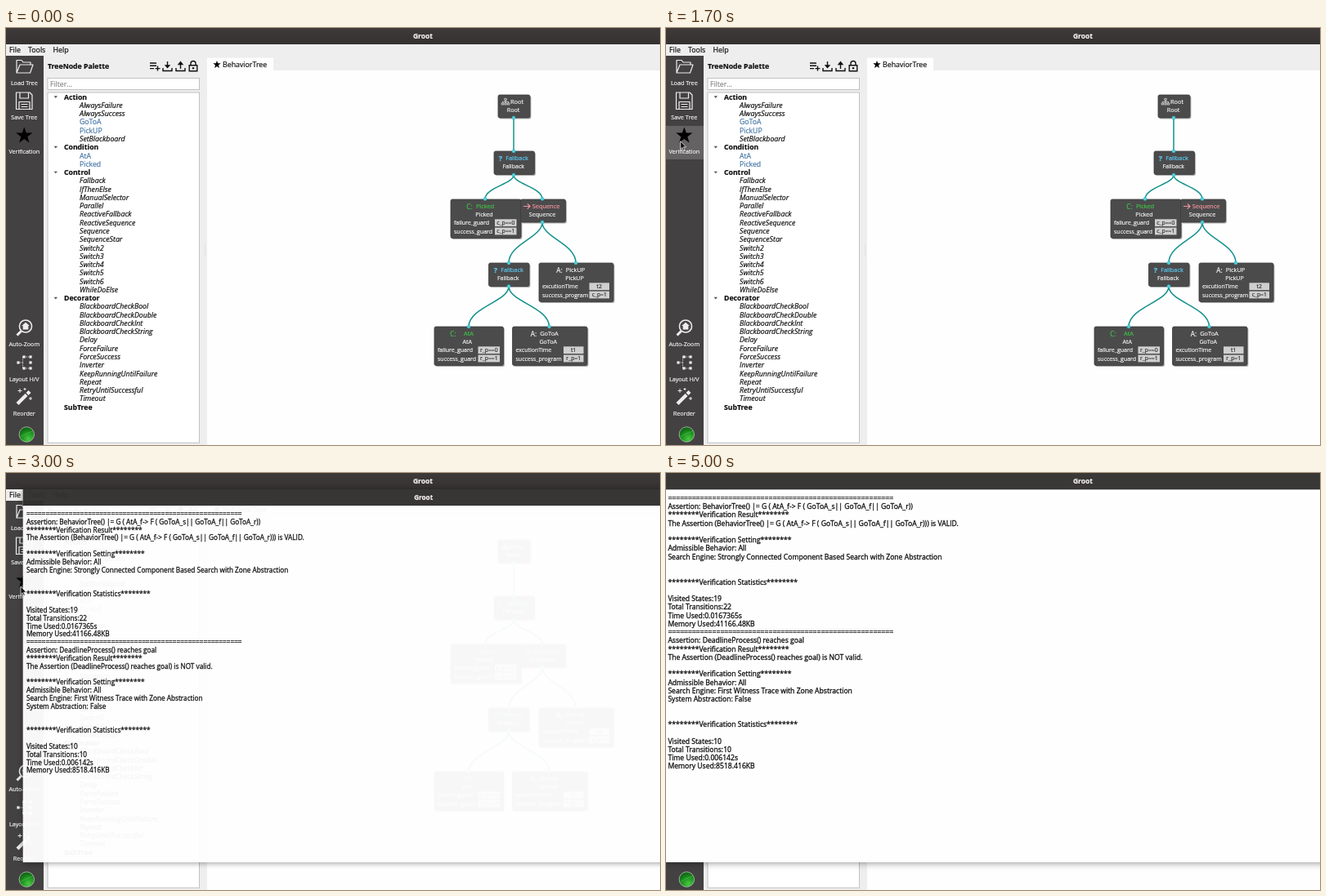
An HTML page for the animation above (5300 ms loop, 800 px wide and 511 px high).

```html
<!DOCTYPE html>
<html lang="en">
<head>
<meta charset="utf-8">
<title>Behavior tree editor</title>
<style>
html, body { margin: 0; width: 100%; height: 100%; overflow: hidden; background: #fff; }
svg { display: block; width: 100vw; height: 100vh; font-family: "Open Sans", "Noto Sans", sans-serif; }
</style>
</head>
<body>
<svg id="stage" viewBox="0 0 800 511">
  <defs>
    <radialGradient id="ball" cx=".62" cy=".8" r=".85">
      <stop offset="0" stop-color="#4cc747"/><stop offset=".45" stop-color="#1f9a22"/><stop offset="1" stop-color="#0d5512"/>
    </radialGradient>
    <linearGradient id="bar" x2="0" y2="1">
      <stop offset="0" stop-color="#3e3a3a"/><stop offset="1" stop-color="#353131"/>
    </linearGradient>
    <path id="star" d="M0-10.5 2.5-3.4H10L4 1.2 6.2 8.4 0 4.1-6.2 8.4-4 1.2-10-3.4H-2.5Z"/>
  </defs>
  <g id="app"></g>
  <g id="dialog"></g>
  <path id="cursor" d="M0 0V9.8L2.2 7.8 3.9 11.4 5.4 10.7 3.8 7.2H6.9Z" fill="#111" stroke="#fff" stroke-width=".7"/>
</svg>
<script>
const LOOP = 5300, STEP = 100;
const byId = id => document.getElementById(id);
const app = byId('app'), dialog = byId('dialog'), cursor = byId('cursor');

function add(parent, tag, attrs) {
  const el = document.createElementNS('http://www.w3.org/2000/svg', tag);
  for (const k in attrs) el.setAttribute(k, attrs[k]);
  return parent.appendChild(el);
}
const rect = (g, x, y, width, height, fill, more) => add(g, 'rect', { x, y, width, height, fill, ...more });
const path = (g, d, more) => add(g, 'path', { d, fill: 'none', ...more });

// y is the middle of the capitals; the thin stroke gives a slightly heavier weight
function text(g, x, y, str, size, fill = '#111', more) {
  const el = add(g, 'text', { x, y: y + size * .36, 'font-size': size, fill, stroke: fill, 'stroke-width': .2, ...more });
  el.textContent = str;
}
const MID = { 'text-anchor': 'middle' }, BOLD = { 'font-weight': 700 }, ITALIC = { 'font-style': 'italic' };

// Frame of the main window
rect(app, 0, 0, 800, 511, '#efeeee');
rect(app, 0, 0, 800, 20, 'url(#bar)');
text(app, 510, 9.5, 'Groot', 8.5, '#f4f2f0', { ...MID, ...BOLD });
[['File', 4], ['Tools', 27], ['Help', 57.5]].forEach(([s, x]) => text(app, x, 27, s, 8.8));
rect(app, 246, 52, 554, 459, '#fefefe');
rect(app, 246, 36.5, 81, 16, '#fefefe');
add(app, 'use', { href: '#star', transform: 'translate(258 45)scale(.48)' });
text(app, 265, 45, 'BehaviorTree', 8.8);
path(app, 'M243.5 266V280', { stroke: '#cfcdcd', 'stroke-dasharray': '1 2' });

// Toolbar
rect(app, 0, 34, 46, 477, '#434141');
const hover = rect(app, 0, 120, 46, 41, '#646262');
[['Load Tree', 67], ['Save Tree', 109], ['Verification', 151.5], ['Auto-Zoom', 387.5], ['Layout H/V', 430.5], ['Reorder', 472]]
  .forEach(([s, y]) => text(app, 22.3, y, s, 7.2, '#f3f3f3', MID));
const LINE = { stroke: '#eee', 'stroke-width': 1.2, 'stroke-linejoin': 'round' };
path(app, 'M13 55V39.5H19L21 42H30V45M13 55 17 45H33L29.5 55Z', LINE);
path(app, 'M12.5 79H29L32 82V99.5H12.5ZM17 79V86H27.5V79M16 99V90.5H29V99M18.5 93.5H26.5M18.5 96.5H26.5', LINE);
add(app, 'use', { href: '#star', transform: 'translate(22.3 132)' });
add(app, 'circle', { cx: 24, cy: 365.5, r: 7.6, fill: '#4a4848', stroke: '#eee', 'stroke-width': 1.5 });
path(app, 'M18.5 371.5 13.5 376.5', { stroke: '#eee', 'stroke-width': 3 });
path(app, 'M24 360.8 28.8 365H27.3V369.5H20.7V365H19.2Z', { fill: '#eee' });
path(app, 'M15 410H20.5V403H28M20.5 410V417H28', { stroke: '#ccc', 'stroke-dasharray': '1.5 1.2' });
[[15, 410], [22, 403], [30, 403], [22, 417], [30, 417], [30, 410]].forEach(([x, y]) =>
  rect(app, x - 1.6, y - 1.6, 3.2, 3.2, '#eee'));
path(app, 'M14 460.5 25 449.5', { stroke: '#eee', 'stroke-width': 4.2 });
path(app, 'M26 448.5 29 445.5', { stroke: '#eee', 'stroke-width': 4.2 });
path(app, 'M17 442V447M14.5 444.5H19.5M23 441V444M21.5 442.5H24.5M30 452V456M28 454H32', { stroke: '#eee' });
add(app, 'circle', { cx: 25.3, cy: 498, r: 9.2, fill: 'url(#ball)', stroke: '#b9c9b6', 'stroke-width': .8 });
path(app, 'M17.5 501Q23 497 33 494', { stroke: '#8be08a', 'stroke-width': .8, opacity: .4 });

// Palette
text(app, 51, 47, 'TreeNode Palette', 8.7, '#111', BOLD);
const INK = { stroke: '#111', 'stroke-width': 1.4 };
path(app, 'M176 43H184M176 46.3H184M176 49.6H181M182.5 49.6H188.5M185.5 46.6V52.6', INK);
path(app, 'M192 49V52.5H203V49M197.5 41V47', INK);
path(app, 'M193.7 45.2H201.3L197.5 49.6Z', { fill: '#111' });
path(app, 'M208 49V52.5H219V49M213.5 50V44', INK);
path(app, 'M209.7 45.2H217.3L213.5 40.6Z', { fill: '#111' });
path(app, 'M226 45.5V43.5A3 3 0 0 1 232 43.5V45.5M224.2 45.7H233.8V52.7H224.2Z', INK);
add(app, 'circle', { cx: 229, cy: 49.2, r: 1.2, fill: '#111' });
const BOX = { stroke: '#c2c0c0', 'stroke-width': 1 };
rect(app, 51, 61.5, 185.5, 14, '#fff', BOX);
text(app, 54, 69, 'Filter...', 8.6, '#8a8a8a');
rect(app, 51, 79, 185.5, 429.3, '#fff', BOX);

const palette = [
  ['Action', 'AlwaysFailure AlwaysSuccess *GoToA *PickUP SetBlackboard'],
  ['Condition', '*AtA *Picked'],
  ['Control', 'Fallback IfThenElse ManualSelector Parallel ReactiveFallback ReactiveSequence Sequence ' +
    'SequenceStar Switch2 Switch3 Switch4 Switch5 Switch6 WhileDoElse'],
  ['Decorator', 'BlackboardCheckBool BlackboardCheckDouble BlackboardCheckInt BlackboardCheckString Delay ' +
    'ForceFailure ForceSuccess Inverter KeepRunningUntilFailure Repeat RetryUntilSuccessful Timeout'],
  ['SubTree', '']
];
const PITCH = 10.27;
let row = 0;
for (const [group, items] of palette) {
  const gy = 84.5 + PITCH * row++;
  text(app, 71, gy, group, 8.7, '#111', BOLD);
  if (items) path(app, `M58.6 ${gy - 1.3}h4.4l-2.2 2.7Z`, { fill: '#555' });
  for (const s of items.split(' ').filter(Boolean)) {
    const y = 84.5 + PITCH * row++;
    if (s[0] === '*') text(app, 90, y, s.slice(1), 8.7, '#4777a6');
    else text(app, 90, y, s, 8.8, '#111', ITALIC);
  }
}

// Tree: edges, nodes, ports
const edges = [
  [621, 110, 621, 151], [621, 180, 586, 209.5], [621, 180, 656, 209.5], [656, 238, 615, 288],
  [656, 238, 697, 288], [615, 316.5, 566, 366], [615, 316.5, 664.5, 366]
];
for (const [x, y, u, v] of edges) {
  const h = v - y;
  path(app, `M${x} ${y}C${x} ${y + h * .38} ${u} ${v - h * .48} ${u} ${v}`, { stroke: '#12908b', 'stroke-width': 1.5 });
}
const BLUE = '#5cc8f2', GREEN = '#3fc044', PINK = '#f0949c', WHITE = '#f2f2f2';
// x, y, w, h, mark, mark x, title, title x, colour, value box x, rows
const nodes = [
  [602, 82, 39, 28, '', 611, 'Root', 625, WHITE],
  [597, 151, 49.5, 28.5, '?', 605, 'Fallback', 625, BLUE],
  [544, 210, 86, 47.5, 'C:', 567, 'Picked', 586, GREEN, 598, ['failure_guard', 'c_p==0', 'success_guard', 'c_p==1']],
  [629.5, 210, 55, 28, '>', 637, 'Sequence', 660.5, PINK],
  [590.5, 288, 49.5, 28.5, '?', 599, 'Fallback', 619, BLUE],
  [652, 288, 91, 47.5, 'A:', 677, 'PickUP', 696.5, WHITE, 713.5, ['excutionTime', 't2', 'success_program', 'c_p=1']],
  [524, 366, 84.5, 47.5, 'C:', 547, 'AtA', 566, GREEN, 577.5, ['failure_guard', 'r_p==0', 'success_guard', 'r_p==1']],
  [619.5, 366, 91.5, 47.5, 'A:', 645.5, 'GoToA', 664.5, WHITE, 682, ['excutionTime', 't1', 'success_program', 'r_p=1']]
];
for (const [x, y, w, h, mark, mx, title, tx, color, bx, rows] of nodes) {
  rect(app, x + 1.4, y + 1.6, w, h, '#8f8f8f', { rx: 2, opacity: .75 });
  rect(app, x, y, w, h, '#4c4b4c', { rx: 2, stroke: '#3c3c3c', 'stroke-width': .8 });
  if (mark === '>') path(app, `M${mx - 4} ${y + 8.5}h8m-3.2-3.2l3.2 3.2-3.2 3.2`, { stroke: color, 'stroke-width': 1.2 });
  else if (mark) text(app, mx, y + 8.7, mark, mark === '?' ? 9 : 8.2, color, { ...MID, ...(mark === '?' ? BOLD : {}) });
  else path(app, `M${mx - 1.2} ${y + 4.4}h2.4v2.2h-2.4ZM${mx} ${y + 6.6}v3.4m-3.6 0v-1.6h7.2v1.6` +
    `M${mx - 4.8} ${y + 10}h2.4v2h-2.4Zm3.6 0h2.4v2h-2.4Zm3.6 0h2.4v2h-2.4Z`, { stroke: WHITE, 'stroke-width': .7 });
  text(app, tx, y + 8.4, title, 7.4, color, MID);
  text(app, x + w / 2 - (rows ? 2 : 1), y + 18.7, title, 7.1, WHITE, MID);
  for (let i = 0; rows && i < 2; i++) {
    const ry = y + 28.7 + i * 10.3, bw = mark === 'C:' ? 26.5 : 24.5;
    text(app, x + 4, ry, rows[2 * i], 7, WHITE);
    rect(app, bx, ry - 4.4, bw, 8.8, '#cfcfcf');
    text(app, bx + bw / 2, ry, rows[2 * i + 1], 6.8, '#333', MID);
  }
}
const ports = new Set(edges.flatMap(([x, y, u, v]) => [x + ' ' + y, u + ' ' + v]));
for (const p of ports) {
  const [cx, cy] = p.split(' ');
  add(app, 'circle', { cx, cy, r: 2.1, fill: '#4fd3dd', stroke: '#2aa9b3', 'stroke-width': .4 });
}

// Result window
rect(dialog, -2, 0, 860, 477, '#fefefe', { style: 'filter:drop-shadow(0 1px 4px rgba(0,0,0,.42))' });
const titleBar = rect(dialog, -2, -.8, 860, 21.1, '#322f2f');
text(dialog, 510, 9.5, 'Groot', 8.5, '#f4f2f0', { ...MID, ...BOLD });
const head = s => '********Verification ' + s + '********';
const rule = '='.repeat(56);
const report = [
  rule, 'Assertion: BehaviorTree() |= G ( AtA_f-> F ( GoToA_s|| GoToA_f|| GoToA_r))', head('Result'),
  'The Assertion (BehaviorTree() |= G ( AtA_f-> F ( GoToA_s|| GoToA_f|| GoToA_r))) is VALID.', '',
  head('Setting'), 'Admissible Behavior: All',
  'Search Engine: Strongly Connected Component Based Search with Zone Abstraction', '', '',
  head('Statistics'), '', 'Visited States:19', 'Total Transitions:22', 'Time Used:0.0167365s', 'Memory Used:41166.48KB',
  rule, 'Assertion: DeadlineProcess() reaches goal', head('Result'),
  'The Assertion (DeadlineProcess() reaches goal) is NOT valid.', '',
  head('Setting'), 'Admissible Behavior: All', 'Search Engine: First Witness Trace with Zone Abstraction',
  'System Abstraction: False', '', '',
  head('Statistics'), '', 'Visited States:10', 'Total Transitions:10', 'Time Used:0.006142s', 'Memory Used:8518.416KB'
];
report.forEach((s, i) => s && text(dialog, 2.4, 30.7 + PITCH * i, s, 8.62, '#0c0c0c', { 'stroke-width': .28 }));

// Pointer stops: time, x, y
const stops = [[100, 792, 330], [900, 38, 175], [1300, 17.5, 138.5], [3900, 18, 139], [4100, 456, 179]];
const easeOut = p => 1 - (1 - p) ** 2;
function pointer(t) {
  let i = 0;
  while (i < stops.length - 2 && t >= stops[i + 1][0]) i++;
  const [t0, x0, y0] = stops[i], [t1, x1, y1] = stops[i + 1];
  const p = easeOut(Math.min(1, Math.max(0, (t - t0) / (t1 - t0))));
  return [x0 + (x1 - x0) * p, y0 + (y1 - y0) * p];
}
const show = (el, on) => el.setAttribute('visibility', on ? 'visible' : 'hidden');

function draw(time) {
  const t = Math.floor(time % LOOP / STEP) * STEP;
  const [x, y] = pointer(t), big = t >= 2400 && t < 3000;
  show(cursor, t >= 100 && t < 4200);
  cursor.setAttribute('transform', `translate(${x} ${y - (big ? 2 : 0)})scale(${big ? 2.05 : 1})`);
  show(hover, t < 3000 && x < 46 && y > 120 && y < 161);

  const rest = 1 - easeOut(Math.min(1, Math.max(0, (t - 3000) / 300)));
  show(dialog, t >= 3000);
  dialog.setAttribute('transform', `translate(${22.6 * rest} ${20.6 * rest})scale(${1 - .043 * rest})`);
  dialog.setAttribute('opacity', 1 - .035 * rest);
  titleBar.setAttribute('fill', t >= 5000 ? '#3a3737' : '#322f2f');
}

const start = performance.now();
function tick() {
  draw(performance.now() - start);
  requestAnimationFrame(tick);
}
tick();
</script>
</body>
</html>
```
